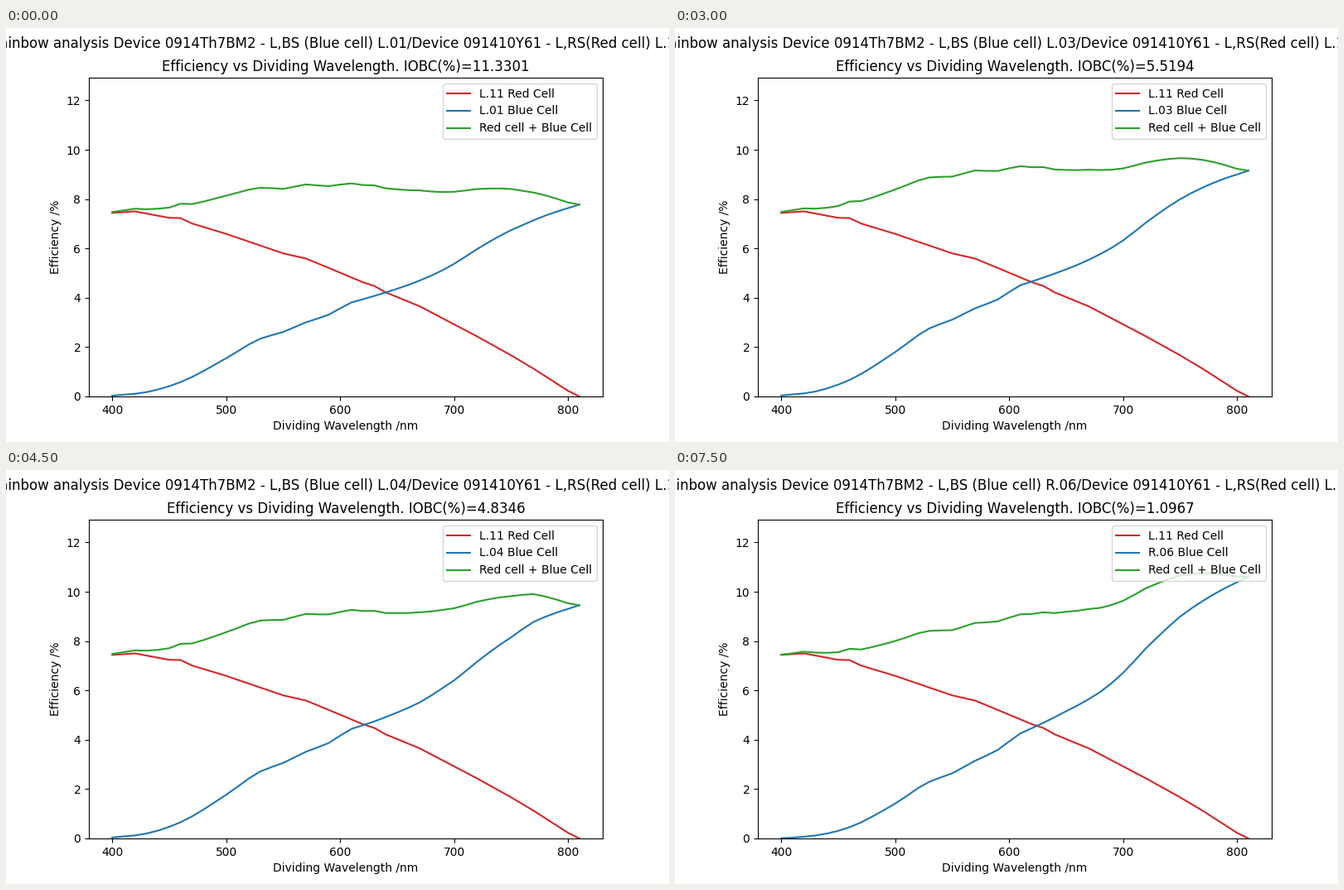
A matplotlib script for the animation above (8000 ms loop, 800 by 500 pixels).

```python
import numpy as np
import matplotlib.pyplot as plt
from matplotlib.animation import FuncAnimation

STEP_MS = 500
STEPS_PER_CELL = 3
FRAMES = 16

wave = np.arange(400, 811, 10)


def linear(*knots):
    """Straight segments through (x, y) knots."""
    return np.interp(wave, *zip(*knots))


def smooth(*knots):
    """Cubic Hermite curve through (x, y) knots."""
    x, y = np.array(knots, dtype=float).T
    slope = np.gradient(y, x)
    k = np.clip(np.searchsorted(x, wave, "right") - 1, 0, len(x) - 2)
    h = x[k + 1] - x[k]
    t = (wave - x[k]) / h
    rise = y[k + 1] - y[k]
    bend = (1 - t) * (h * slope[k] - rise) - t * (h * slope[k + 1] - rise)
    return y[k] + t * rise + t * (1 - t) * bend


red = linear(
    (400, 7.44), (420, 7.50), (450, 7.24), (460, 7.23), (470, 7.01),
    (500, 6.59), (550, 5.80), (570, 5.59), (590, 5.21), (620, 4.63),
    (630, 4.48), (640, 4.22), (670, 3.65), (720, 2.44), (750, 1.67),
    (770, 1.12), (800, 0.23), (810, 0))

base = smooth(
    (400, .04), (430, .20), (460, .67), (500, 1.80), (530, 2.76),
    (550, 3.11), (570, 3.57), (590, 3.93), (610, 4.51), (620, 4.66),
    (640, 4.98), (670, 5.54), (700, 6.32), (720, 7.04), (750, 7.99),
    (780, 8.67), (810, 9.15))

# Most blue cells follow the base curve times a slowly changing ratio.
cells = [
    ("L.01", "11.3301", base * linear(
        (400, .88), (500, .861), (550, .84), (610, .845), (700, .85),
        (760, .842), (810, .85))),
    ("L.02", "3.0086", base * linear(
        (400, 0), (420, .58), (450, .85), (460, .55), (470, .637),
        (480, .957), (520, .984), (530, .866), (560, .88), (620, .937),
        (680, .96), (690, 1.017), (730, 1.011), (740, .971),
        (780, .982), (790, 1.015), (810, 1.02))),
    ("L.03", "5.5194", base),
    ("L.04", "4.8346", base * linear(
        (400, 1), (450, .983), (630, .985), (670, .996), (690, 1.012),
        (750, 1.02), (770, 1.037), (810, 1.033))),
    ("R.05", "0.0033", 0.155 * ((wave - 400) / 410) ** 1.3),
    ("R.06", "1.0967", base * linear(
        (400, .25), (420, .58), (440, .613), (480, .748), (520, .824),
        (550, .849), (610, .945), (650, 1.001), (680, 1.029),
        (720, 1.094), (750, 1.125), (810, 1.16))),
]

plt.rcParams["font.family"] = "DejaVu Sans"
fig, ax = plt.subplots(figsize=(8, 5), dpi=100)


def draw(i):
    cell, iobc, blue = cells[i // STEPS_PER_CELL]
    ax.clear()
    ax.plot(wave, red, color="tab:red", label="L.11 Red Cell")
    ax.plot(wave, blue, color="tab:blue", label=f"{cell} Blue Cell")
    ax.plot(wave, red + blue, color="tab:green",
            label="Red cell + Blue Cell")
    ax.set_ylim(0, 12.92)
    ax.set_xlabel("Dividing Wavelength /nm")
    ax.set_ylabel("Efficiency /%")
    ax.set_title(f"Efficiency vs Dividing Wavelength. IOBC(%)={iobc}")
    ax.legend(loc="upper right")
    fig.suptitle(f"Rainbow analysis Device 0914Th7BM2 - L,BS (Blue cell) "
                 f"{cell}/Device 091410Y61 - L,RS(Red cell) L.11")
    return ax.lines


anim = FuncAnimation(fig, draw, frames=FRAMES, interval=STEP_MS,
                     init_func=lambda: draw(0), repeat=True, repeat_delay=0)
plt.show()
```
